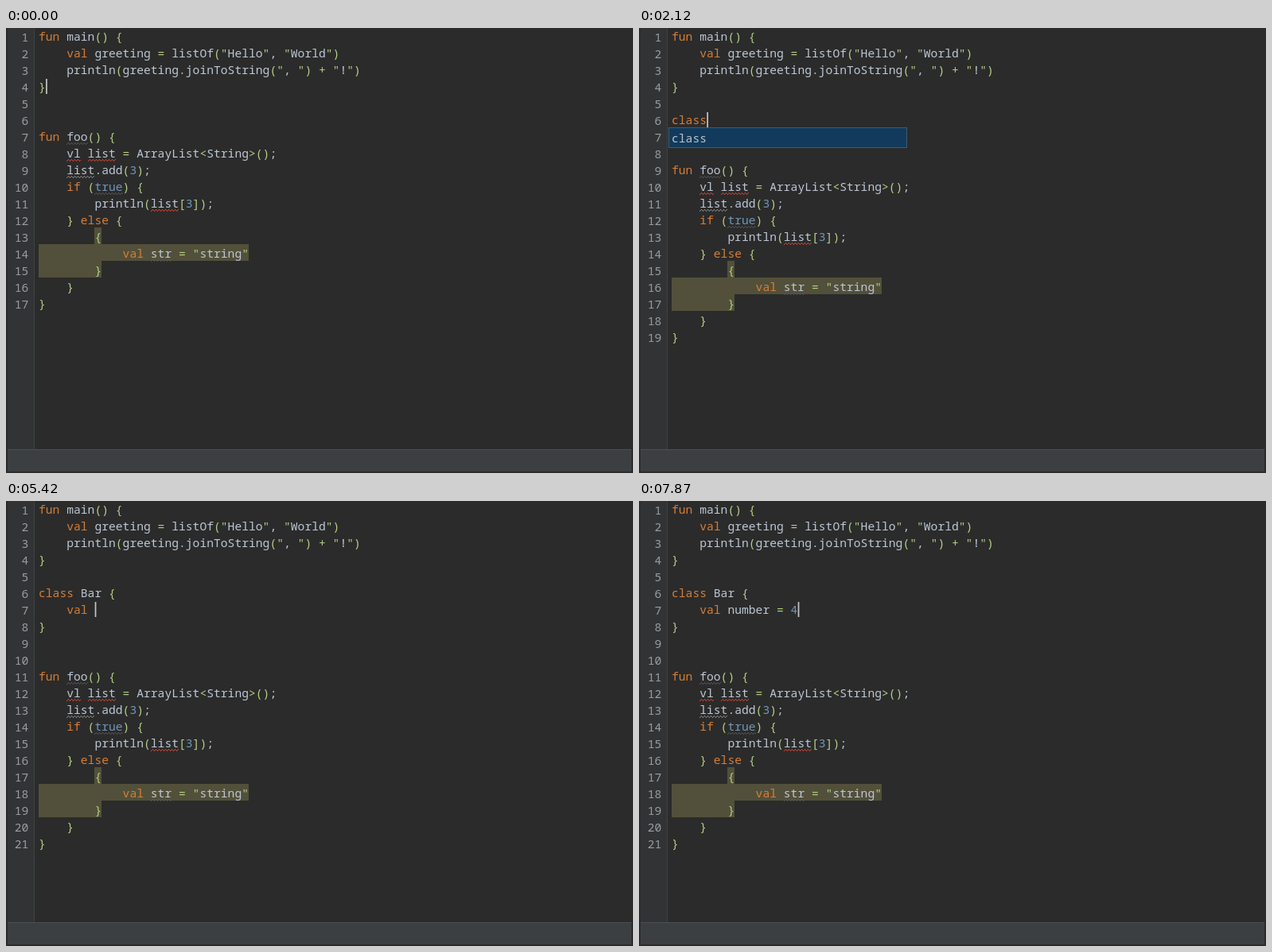
Animation of 788x560 px, one loop 8 s. Source, as an HTML page with a canvas:

```html
<!DOCTYPE html>
<html lang="en">
<head>
<meta charset="utf-8">
<title>Code editor</title>
<style>
  html, body { margin: 0; width: 100%; height: 100%; overflow: hidden; background: #2b2b2b; }
  canvas { display: block; }
</style>
</head>
<body>
<canvas id="stage" width="788" height="560"></canvas>
<script>
const ctx = document.getElementById("stage").getContext("2d");
const LOOP = 8000, LEFT = 41, CELL = 8.8, ROW = 21;
const COLORS = { plain: "#bcc7d4", keyword: "#d67e35", number: "#7096b8", symbol: "#b4d083" };
const WAVES = { error: "#e0452f", warning: "#8e8e8e", weak: "#585858" };

const HEAD = `fun main() {
    val greeting = listOf("Hello", "World")
    println(greeting.joinToString(", ") + "!")
}`;
const TAIL = `fun foo() {
    vl list = ArrayList<String>();
    list.add(3);
    if (true) {
        println(list[3]);
    } else {
        {
            val str = "string"
        }
    }
}`;

// Wavy underlines: row within TAIL, column, length, kind.
const MARKS = [
  [0, 4, 3, "weak"], [1, 4, 2, "error"], [1, 7, 4, "error"], [2, 4, 4, "warning"],
  [3, 8, 4, "weak"], [4, 16, 4, "error"], [7, 16, 3, "weak"]
];
// Shaded ranges: row within TAIL, first column, end column.
const SHADES = [[6, 8, 9], [7, 0, 30], [8, 0, 9]];

// Each step: start time, text between HEAD and TAIL ("|" is the caret), options.
const typed = (time, text, options) => [time, "\n\n" + text + "\n\n\n", options];
const inClass = (time, text, options) => typed(time, "class Bar {\n    " + text + "\n}", options);
const numberPopup = { popup: { word: "number", col: 8, row: 6, width: 150 } };
const STEPS = [
  [0, "|\n\n\n"],
  [460, "\n|\n\n\n"],
  [530, "\n|\n\n\n", { swapped: true }],
  typed(860, "|"),
  typed(1260, "c|"),
  typed(1460, "cl|"),
  typed(1530, "cla|"),
  typed(1790, "clas|"),
  typed(1920, "class|"),
  typed(2120, "class|", { popup: { word: "class", col: 0, row: 5, width: 300 } }),
  typed(2250, "class |"),
  typed(2580, "class B|"),
  typed(2980, "class Ba|"),
  typed(3180, "class Bar|"),
  typed(3640, "class Bar"),
  typed(4100, "class Bar |"),
  typed(4300, "class Bar {|}"),
  inClass(4500, "|"),
  inClass(4900, "v|"),
  inClass(5030, "va|"),
  inClass(5160, "val|"),
  inClass(5420, "val |"),
  inClass(5820, "val n|"),
  inClass(5950, "val nu|"),
  inClass(6150, "val num|"),
  inClass(6280, "val numb|"),
  inClass(6350, "val numbe|"),
  inClass(6480, "val number|"),
  inClass(6740, "val number|", numberPopup),
  inClass(6870, "val number |"),
  inClass(6940, "val number =|"),
  inClass(7010, "val number = |"),
  inClass(7470, "val number = "),
  inClass(7870, "val number = 4|")
];

function box(x, y, w, h, color) {
  ctx.fillStyle = color;
  ctx.fillRect(x, y, w, h);
}

function write(text, x, baseline, color) {
  ctx.fillStyle = color;
  [...text].forEach((ch, i) => {
    if (ch !== " ") ctx.fillText(ch, x + i * CELL, baseline);
  });
}

function tokenColor(token) {
  if (/^(fun|val|class|if|else)$/.test(token)) return COLORS.keyword;
  if (/^(\d+|true)$/.test(token)) return COLORS.number;
  return /^[(){}[\]<>="+]/.test(token) ? COLORS.symbol : COLORS.plain;
}

function writeCode(line, row) {
  for (const match of line.matchAll(/\w+|[^\w\s]/g)) {
    write(match[0], LEFT + match.index * CELL, row * ROW + 16, tokenColor(match[0]));
  }
}

function wave(row, col, length, color) {
  const start = Math.round(LEFT + col * CELL);
  const end = Math.round(LEFT + (col + length) * CELL);
  for (let x = start; x < end; x++) {
    box(x, row * ROW + 18 + Math.abs((x - start) % 4 - 2), 1, 1, color);
  }
}

function drawFrame() {
  box(0, 0, 788, 560, "#2b2b2b");
  box(2, 0, 33, 530, "#313335");
  box(35, 0, 1, 530, "#3f4142");
  box(2, 530, 784, 28, "#3c3f41");
  box(2, 530, 784, 1, "#4c4f51");
}

function drawPopup({ word, col, row, width }) {
  const x = LEFT + Math.round(col * CELL) - 4, y = row * ROW + 20;
  box(x, y, width, 26, "#3d5c72");
  box(x + 1, y + 1, width - 2, 24, "#113a5c");
  write(word, x + 4, y + 19, "#bac4cc");
}

function render(time) {
  const [, middle, { swapped, popup } = {}] = STEPS.findLast(step => step[0] <= time);
  const lines = (HEAD + middle + TAIL).split("\n");
  const tailRow = lines.length - TAIL.split("\n").length;
  const swap = { error: "warning", warning: "error", weak: "weak" };

  drawFrame();
  for (const [row, from, to] of SHADES) {
    box(LEFT + Math.round(from * CELL), (tailRow + row) * ROW - 1,
        Math.round(to * CELL) - Math.round(from * CELL), ROW, "#52503a");
  }
  for (const [row, col, length, kind] of MARKS) {
    wave(tailRow + row, col, length, WAVES[swapped ? swap[kind] : kind]);
  }

  ctx.font = "14.667px 'Noto Sans Mono', 'DejaVu Sans Mono', monospace";
  lines.forEach((line, row) => {
    const label = String(row + 1);
    write(label, 28.4 - label.length * CELL, row * ROW + 17, "#999da0");
    writeCode(line.replace("|", ""), row);
    const caret = line.indexOf("|");
    if (caret >= 0) box(LEFT + caret * CELL + 0.3, row * ROW + 1, 1.7, 19, "#c4c4c4");
  });
  if (popup) drawPopup(popup);
}

function tick() {
  render(performance.now() % LOOP);
  requestAnimationFrame(tick);
}
tick();
</script>
</body>
</html>
```
